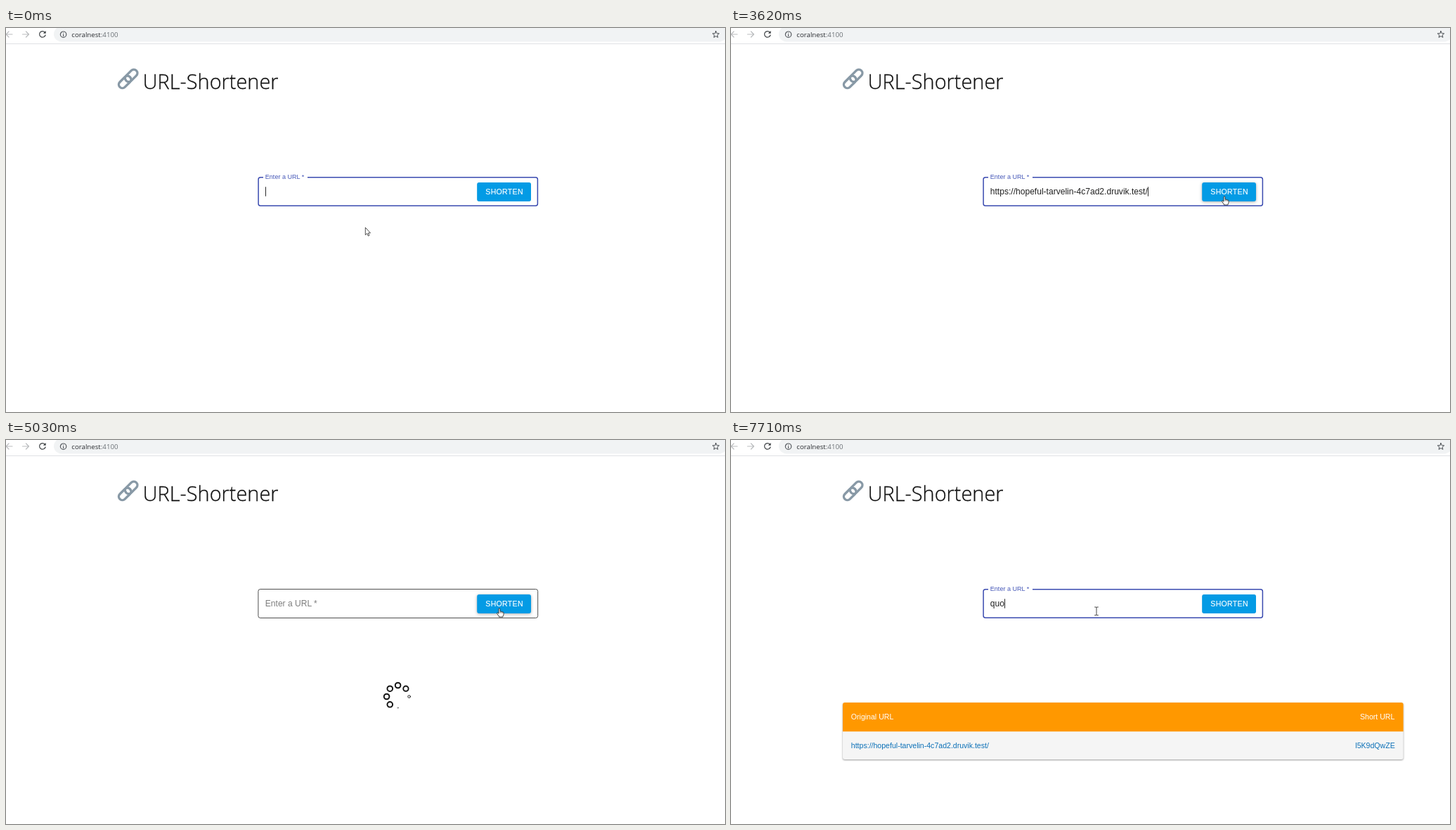
Animation of 1023 by 547 pixels, one loop 8000 ms. Source, as an HTML page:

```html
<!DOCTYPE html>
<html lang="en">
<head>
<meta charset="utf-8">
<title>Link shortener demo</title>
<style>
  html, body { margin: 0; width: 100%; height: 100%; overflow: hidden; background: #fff; }
  svg { display: block; width: 100%; height: 100%; }
  text { font-family: "Liberation Sans", Arial, sans-serif; white-space: pre; }
  .small { font-size: 10.57px; }
  .field { font-size: 12.07px; }
  .bar { font: 9.7px "Open Sans", "Noto Sans", sans-serif; }
  .title { font: 300 28.9px "Open Sans", "Noto Sans", sans-serif; }
  .line { fill: none; stroke-linecap: round; stroke-linejoin: round; }
</style>
</head>
<body>
<svg viewBox="0 0 1023 547">
  <rect width="1023" height="547" fill="#fff"/>

  <!-- browser bar -->
  <rect x="68" y="-2" width="958" height="21.5" rx="10.7" fill="#f1f3f4"/>
  <path d="M0 22.5H1023" stroke="#dfe1e4"/>
  <g class="line" stroke-width="1.2">
    <path d="M9 9H0M4 5L0 9L4 13" stroke="#babcbe"/>
    <path d="M23.5 9H32.5M28.5 5L32.5 9L28.5 13" stroke="#babcbe"/>
    <path d="M55.2 6A4.3 4.3 0 1 0 56.1 10" stroke="#3c4043" stroke-width="1.2"/>
    <circle cx="81.6" cy="9.2" r="4.2" stroke="#55595e"/>
    <path d="M81.6 9V11.3M81.6 7V7.1" stroke="#55595e"/>
    <path id="star" stroke="#4d5156" stroke-width="1"/>
  </g>
  <path d="M56.7 4V7.8H52.9Z" fill="#3c4043"/>
  <text class="bar" x="93.3" y="12.9" fill="#2b2e32">coralnest<tspan fill="#6b7075">:4100</tspan></text>

  <!-- heading -->
  <g class="line" transform="translate(173.7 72.4) rotate(-45)" stroke="#8899a6" stroke-width="3.4">
    <rect x="-16.6" y="-5.1" width="20.4" height="10.2" rx="5.1"/>
    <rect x="-3.8" y="-5.1" width="20.4" height="10.2" rx="5.1"/>
  </g>
  <text class="title" x="194.8" y="87.2" fill="#111" stroke="#111" stroke-width=".3">URL-Shortener</text>

  <!-- form -->
  <rect id="box" fill="none" rx="3"/>
  <rect id="notch" y="210" height="5" fill="#fff"/>
  <text id="label" class="field">Enter a URL *</text>
  <text id="value" class="field" x="368.8" y="237.2" fill="#212121"></text>
  <rect id="caret" y="226.3" width="0.9" height="13.4" fill="#111"/>
  <rect id="button" x="670.2" y="220" width="76.8" height="27" rx="3" fill="#039be5"/>
  <text class="small" x="682.3" y="236.9" letter-spacing="0.3" fill="#fff" stroke="#fff" stroke-width=".15">SHORTEN</text>

  <g id="loader" class="line" stroke="#151515" stroke-width="2"></g>

  <!-- result -->
  <g id="table">
    <rect x="159" y="374" width="797.6" height="81" rx="3" fill="#f5f5f5" style="filter:drop-shadow(0 1px 1px rgba(0,0,0,.4))"/>
    <path d="M159 415.3V377a3 3 0 0 1 3-3H953.6a3 3 0 0 1 3 3V415.3Z" fill="#ff9800"/>
    <g class="small" fill="#fff">
      <text x="170.8" y="398.2">Original URL</text>
      <text x="944.3" y="398.2" text-anchor="end">Short URL</text>
    </g>
    <g class="small" fill="#0b70b7">
      <text id="link" x="170.8" y="438.6"></text>
      <text x="944.7" y="438.6" text-anchor="end">l5K9dQwZE</text>
    </g>
  </g>

  <!-- pointers, hot spot at 0,0 -->
  <g id="arrow" transform="translate(511.3 284.2)">
    <path d="M0 0V10.6L2.4 8.4L4 12L5.6 11.3L4.1 7.8H7.2Z" fill="#fff" stroke="#222" stroke-width=".8"/>
  </g>
  <g id="beam" class="line" stroke="#333" stroke-width=".9">
    <path d="M-2.4 -5.8H-.8L0 -5.2L.8 -5.8H2.4M0 -5.2V5.2M-2.4 5.8H-.8L0 5.2L.8 5.8H2.4"/>
  </g>
  <g id="hand" transform="translate(702 239.6)">
    <path d="M-1 .8Q0 -.6 1 .8V4.6Q2 4 2.7 5Q3.8 4.5 4.4 5.4Q5.8 5.1 6 6.6V9Q5.8 10.4 5 11.4V12.4H-.6V11.4L-3.5 7.6Q-3.6 6.3 -2.3 6.5L-1 7.7Z" fill="#fff" stroke="#222" stroke-width=".85" stroke-linejoin="round"/>
    <path d="M1 4.8V7M2.7 5.2V7.1M4.4 5.6V7.2" stroke="#222" stroke-width=".6"/>
  </g>
  <circle id="press" r="9" fill="#fff200" fill-opacity=".55"/>
</svg>
<script>
const LOOP = 8000;
const ADDRESS = "https://hopeful-tarvelin-4c7ad2.druvik.test/";
const BLUE = [70, 88, 184], GREY = [125, 125, 125];
const $ = id => document.getElementById(id);
const set = (id, attrs) => {
  for (const k in attrs) $(id).setAttribute(k, attrs[k]);
};
const show = (id, on) => set(id, { visibility: on ? "visible" : "hidden" });
const within = (t, a, b) => t >= a && t < b;
const clamp = x => Math.min(1, Math.max(0, x));
const easeOut = x => 1 - Math.pow(1 - clamp(x), 3);
const lerp = (a, b, k) => a + (b - a) * k;
const mix = (a, b, k) => `rgb(${a.map((v, i) => Math.round(lerp(v, b[i], k)))})`;
const step = (t, start, len) => start + Math.floor((t - start) / len + 1e-6) * len;

const star = [];
for (let i = 0; i < 10; i++) {
  const r = i % 2 ? 2.2 : 5, a = i * Math.PI / 5;
  star.push((1010 + r * Math.sin(a)).toFixed(2) + " " + (9.4 - r * Math.cos(a)).toFixed(2));
}
set("star", { d: "M" + star.join("L") + "Z" });
$("link").textContent = ADDRESS;

const rings = Array.from({ length: 8 }, () => {
  const c = document.createElementNS("http://www.w3.org/2000/svg", "circle");
  c.setAttribute("r", 3.8);
  return $("loader").appendChild(c);
});

// the caret starts visible and toggles at each of these times
const caretFlips = [140, 500, 780, 1240, 2130, 2680, 3160, 3620, 4060, 6440, 7010, 7470];
const caretOn = t => caretFlips.filter(f => f <= t).length % 2 === 0;

function typed(t) {
  if (within(t, 1640, 4480)) return ADDRESS;
  if (t < 7470) return "";
  return "quo".slice(0, t < 7630 ? 1 : t < 7710 ? 2 : 3);
}

function drawField(t) {
  const focused = t < 4320 || t >= 6440;
  // raised: 1 when the label sits in the border, 0 when it is the placeholder
  let raised = 1, blue = 1;
  if (within(t, 4320, 6440)) {
    const s = step(t, 4320, 78);
    raised = 1 - easeOut((s - 4440) / 200);
    blue = 1 - clamp((s - 4390) / 180);
  } else if (t >= 6440) {
    const s = step(t, 6440, 83);
    raised = easeOut((s - 6440) / 220);
    blue = clamp((s - 6440) / 180);
  }
  set("box", focused
    ? { x: 359.1, y: 212.8, width: 397.3, height: 40.4, stroke: "#3a4ab0", "stroke-width": 1.5 }
    : { x: 358.9, y: 212.5, width: 397.8, height: 41, stroke: "#3c3c3c", "stroke-width": 0.9 });
  set("notch", { x: focused ? 366 : 365, width: 63 * raised });
  set("label", {
    transform: `translate(368.8 ${lerp(237.2, 215.3, raised)}) scale(${lerp(1, 0.75, raised)})`,
    fill: mix(GREY, BLUE, blue)
  });

  const text = typed(t);
  if ($("value").textContent !== text) $("value").textContent = text;
  const end = text ? $("value").getComputedTextLength() : 0;
  set("caret", { x: 369 + end });
  show("caret", caretOn(t));

  const hover = within(t, 3620, 6020);
  $("button").style.filter = hover
    ? "drop-shadow(0 1.6px 2px rgba(0,0,0,.32))"
    : "drop-shadow(0 .6px .6px rgba(0,0,0,.16))";
}

function drawLoader(t) {
  const on = within(t, 4476, 5100);
  show("loader", on);
  if (!on) return;
  const head = 3 + (step(t, 4320, 78) - 5022) * 8 / 1000;
  rings.forEach((ring, i) => {
    const age = (((head - i) % 8) + 8) % 8;
    const size = age < 6 ? Math.min(1, 0.48 * age) : Math.max(0, 1 - 0.8 * (age - 6));
    const a = i * Math.PI / 4;
    const x = 557.6 + 16 * Math.sin(a), y = 365.5 - 16 * Math.cos(a);
    ring.setAttribute("transform", `translate(${x} ${y}) scale(${size})`);
  });
}

function drawPointer(t) {
  show("arrow", t < 500);
  show("hand", within(t, 3620, 6020));
  show("beam", within(t, 500, 3620) || t >= 6020);
  const k = t < 3160 ? 0 : clamp((step(t, 3160, 72.5) - 3160 + 72.5) / 362.5);
  const [x, y] = t >= 6020 ? [520, 243.8] : [lerp(465, 492.5, k), lerp(231.6, 233.2, k)];
  set("beam", { transform: `translate(${x} ${y})` });

  const first = within(t, 4320, 4476);
  show("press", first || within(t, 6440, 6600));
  set("press", first ? { cx: 702, cy: 239.8 } : { cx: 519, cy: 243.3 });
}

function draw(t) {
  drawField(t);
  drawLoader(t);
  drawPointer(t);
  show("table", t >= 5100);
}

const begin = performance.now();
function tick() {
  draw((performance.now() - begin) % LOOP);
  requestAnimationFrame(tick);
}
draw(0);
requestAnimationFrame(tick);
</script>
</body>
</html>
```
